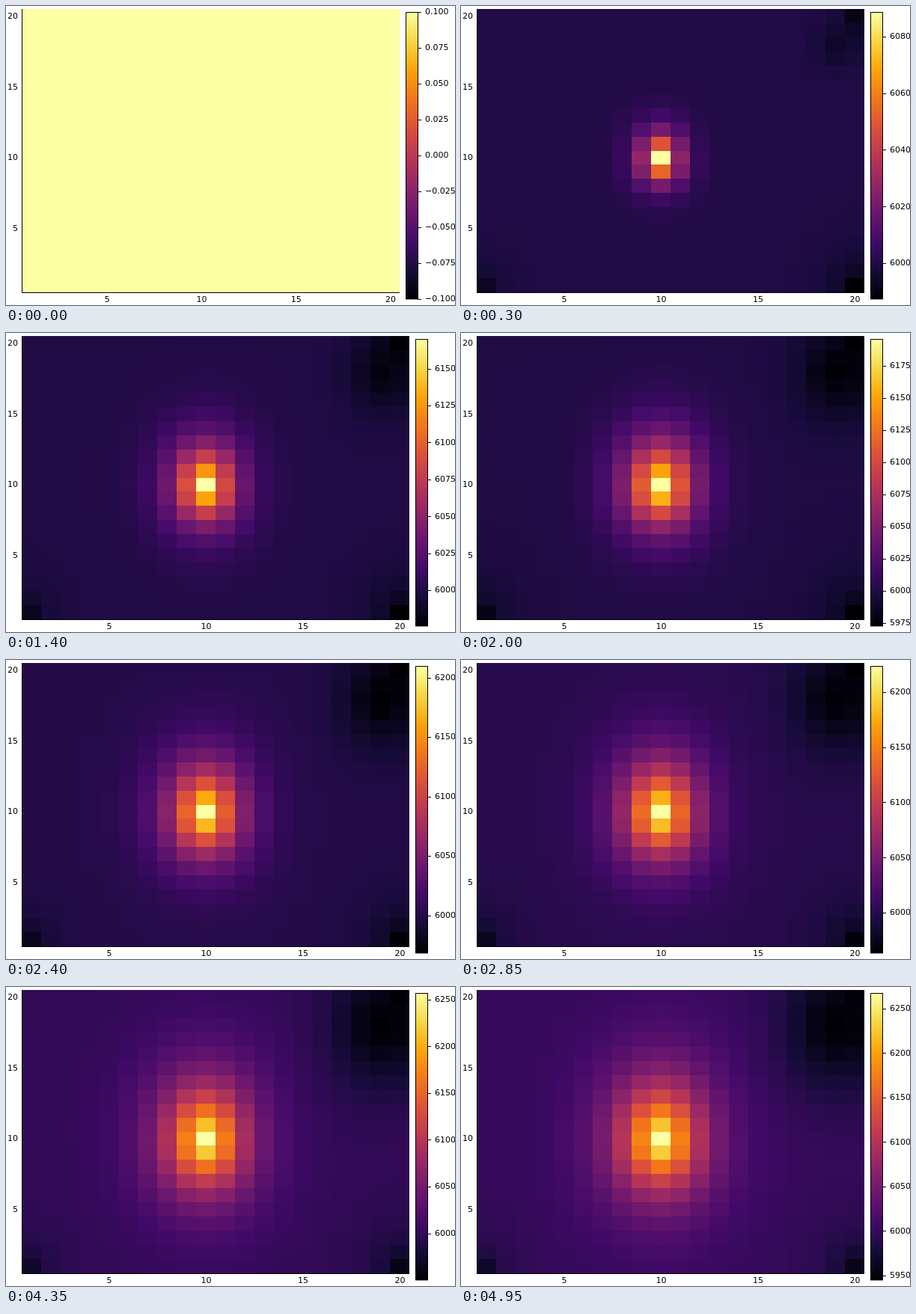
Recreate the animation shown at these times as an HTML page with a canvas. Size 600 by 400 pixels, loop 5 s.

```html
<!DOCTYPE html>
<html lang="en">
<head>
<meta charset="utf-8">
<title>Pressure heatmap</title>
<style>
html, body { margin: 0; width: 100%; height: 100%; overflow: hidden; background: #fff; }
canvas { display: block; }
</style>
</head>
<body>
<canvas id="stage" width="600" height="400"></canvas>
<script>
const ctx = document.getElementById('stage').getContext('2d');
const SIZE = 20, STEPS = 100, STEP_MS = 50, BASE = 6000;
const TOP = 4, BOTTOM = 383, LEFT = 21;
const BAR_TOP = 8, BAR_BOTTOM = 392;

// Inferno colour map
const inferno = ['000004', '160b39', '420a68', '6a176e', '932667', 'bc3754',
  'dd513a', 'f37819', 'fca50a', 'f6d746', 'fcffa4'];
const rgb = inferno.map(h => [0, 2, 4].map(i => parseInt(h.slice(i, i + 2), 16)));

function color(v) {
  const s = Math.max(0, Math.min(1, v)) * 10, i = Math.min(9, Math.floor(s));
  return `rgb(${rgb[i].map((c, k) => Math.round(c + (rgb[i + 1][k] - c) * (s - i)))})`;
}

// Peak rise and deepest drop: [step, high, low]
const extremes = [[1, 36, 4.7], [6, 88.7, 12.7], [17, 139.6, 20.8], [40, 195.9, 27.3],
  [57, 223.7, 36.6], [75, 245.3, 44.5], [99, 267.6, 55.1]];

function extreme(t, k) {
  let i = 0;
  while (i < extremes.length - 2 && t > extremes[i + 1][0]) i++;
  const a = extremes[i], b = extremes[i + 1];
  return a[k] * Math.pow(b[k] / a[k], Math.log(t / a[0]) / Math.log(b[0] / a[0]));
}

// Injection mound around cell (10, 10), wider along y
function mound(x, y, t) {
  const dx = Math.abs(x - 10), dy = y < 10 ? 1.12 * (10 - y) - 0.24 : y - 10;
  const ax = (x < 10 ? 2.3 : 2.45) * t ** -0.385, ay = 1.27 * t ** -0.42;
  const k = 2 / 1.3;
  return Math.exp(-((ax ** k * dx * dx + ay ** k * dy * dy) ** (1 / k)));
}

// Drawdown around the four producing wells
function drawdown(x, y, t, low) {
  const wide = (dx, dy) =>
    Math.exp(-((0.15 * dx * dx + 0.05 * dy * dy) ** 0.9) * (t / 99) ** -0.7);
  const narrow = (dx, dy, f) =>
    Math.exp(-Math.sqrt(dx * dx + 0.4 * dy * dy) * f * 1.3 * t ** -0.09);
  return Math.max(
    Math.min(low, 1.55 * t ** 0.78) * wide(x > 19 ? 0.6 : 19 - x, y - 18),
    Math.min(low, 3.1 * t ** 0.62) * wide(20 - x, 20 - y),
    Math.min(low, 6.1 * t ** 0.42) * narrow(20 - x, y - 1, 1),
    2.6 * t ** 0.54 * narrow(x - 1, y - 1, 1.25));
}

function tickStep(range) {
  if (range < 1) return 0.025;
  return range < 50 ? 5 : range < 85 ? 10 : range < 190 ? 20 : range < 240 ? 25 : 50;
}

function label(text, x, y, align) {
  ctx.textAlign = align;
  ctx.fillText(text, x, y);
}

function drawBar(x, min, max) {
  const fill = ctx.createLinearGradient(0, BAR_BOTTOM, 0, BAR_TOP);
  inferno.forEach((h, i) => fill.addColorStop(i / 10, '#' + h));
  ctx.fillStyle = fill;
  ctx.fillRect(x, BAR_TOP, 16, BAR_BOTTOM - BAR_TOP);
  ctx.strokeRect(x + 0.5, BAR_TOP + 0.5, 16, BAR_BOTTOM - BAR_TOP - 0.5);

  ctx.fillStyle = '#000';
  const step = tickStep(max - min);
  for (let n = Math.ceil(min / step - 1e-6); n <= max / step + 1e-6; n++) {
    const v = n * step;
    const y = BAR_BOTTOM - (v - min) / (max - min) * (BAR_BOTTOM - BAR_TOP);
    ctx.fillRect(x + 16, Math.round(y), 5, 1);
    label(step < 1 ? v.toFixed(3).replace('-', '\u2212') : String(v), x + 26, y + 0.5, 'left');
  }
}

function draw(t) {
  const right = t ? 539 : 526;
  const high = t ? extreme(t, 1) : 0, low = t ? extreme(t, 2) : 0;
  const cw = (right - LEFT) / SIZE, ch = (BOTTOM - TOP) / SIZE;
  ctx.fillStyle = '#fff';
  ctx.fillRect(0, 0, 600, 400);

  for (let y = 1; y <= SIZE; y++) {
    for (let x = 1; x <= SIZE; x++) {
      const v = t ? (high * mound(x, y, t) - drawdown(x, y, t, low) + low) / (high + low) : 1;
      const x0 = Math.round(LEFT + (x - 1) * cw), x1 = Math.round(LEFT + x * cw);
      const y0 = Math.round(BOTTOM - y * ch), y1 = Math.round(BOTTOM - (y - 1) * ch);
      ctx.fillStyle = color(v);
      ctx.fillRect(x0, y0, x1 - x0, y1 - y0);
    }
  }

  ctx.fillStyle = ctx.strokeStyle = '#000';
  ctx.lineWidth = 1;
  ctx.fillRect(LEFT, TOP, 1, BOTTOM - TOP + 1);
  ctx.fillRect(LEFT, BOTTOM, right - LEFT, 1);
  ctx.font = '11px "DejaVu Sans", sans-serif';
  ctx.textBaseline = 'middle';
  for (let n = 5; n <= SIZE; n += 5) {
    label(n, LEFT + 0.5 + (n - 0.5) * cw, 393, 'center');
    label(n, 16, BOTTOM - (n - 0.5) * ch + 0.5, 'right');
  }
  drawBar(right + 8, t ? BASE - low : -0.1, t ? BASE + high : 0.1);
}

const start = performance.now();
function tick() {
  draw(Math.floor((performance.now() - start) / STEP_MS) % STEPS);
  requestAnimationFrame(tick);
}
tick();
</script>
</body>
</html>
```
